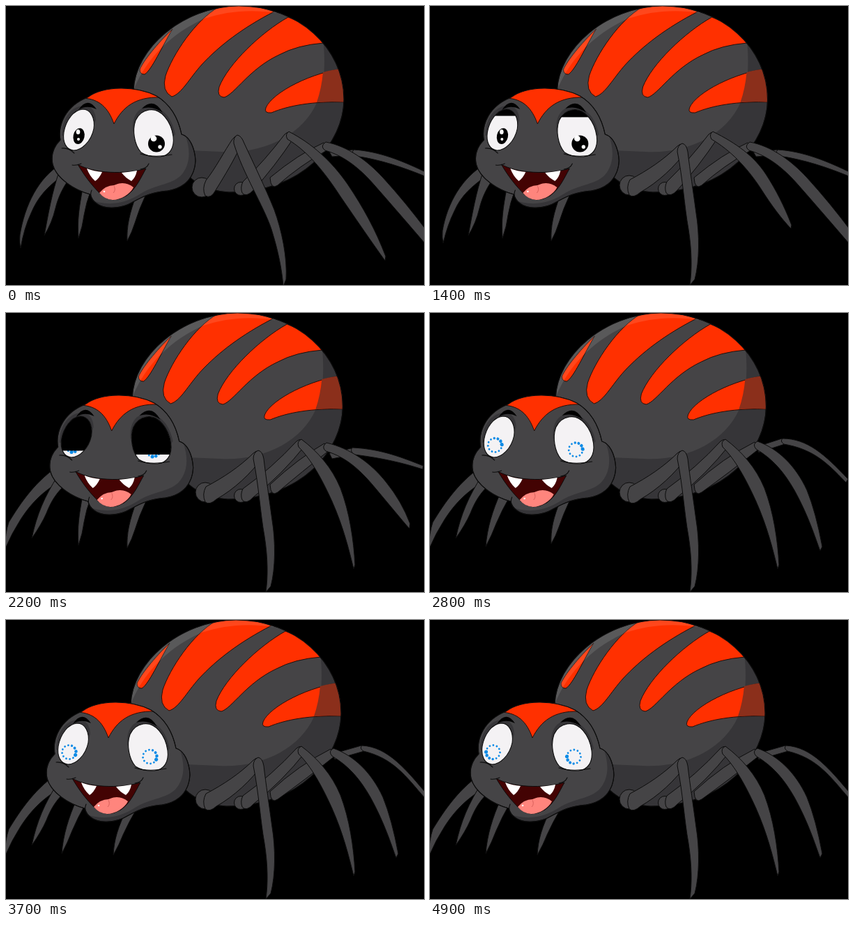
Write an HTML page without scripts that moves like this. It is 600 by 400 pixels and loops after 5000 ms.

```html
<!DOCTYPE html>
<html lang="en">
<head>
<meta charset="utf-8">
<title>Spider</title>
<style>
  html, body { margin: 0; width: 100%; height: 100%; overflow: hidden; background: #000; }
  svg { display: block; width: 100%; height: 100%; }
  .skin { fill: #454446; stroke: #0c0c0c; stroke-width: 1; stroke-linejoin: round; }
  .red { fill: #ff3000; stroke: #1a0a06; stroke-width: .9; }
  .shade { fill: #18181b; opacity: .32; }
  .light { fill: #fff; opacity: .11; }
  .white { fill: #f4f2f4; }
  .line { fill: none; stroke: #0c0c0c; stroke-width: 1.1; stroke-linecap: round; }
  .spin { fill: #0d8be6; }
</style>
</head>
<body>
<svg viewBox="0 0 600 400" preserveAspectRatio="none">
  <defs>
    <path id="body" d="M183 121C185 62 252 1 334 0C420 0 485 60 485 134C485 196 426 268 320 267C283 265 262 247 250 230L196 150Z"/>
    <clipPath id="inBody"><use href="#body"/></clipPath>
    <path id="skull" d="M117 131C140 114 186 114 216 129C236 141 247 160 252 184C263 187 271 202 272 222C271 244 258 261 232 265C206 267 194 275 182 281C166 291 141 292 130 283Q123 278 121 270C98 264 72 247 67 227C64 213 69 201 78 192C74 170 86 143 117 131Z"/>
    <clipPath id="inSkull"><use href="#skull"/></clipPath>
    <path id="eyeL" d="M110 148C122 148 128 161 126 176C122 195 108 207 97 207C86 206 81 195 83 181C86 164 97 149 110 148Z"/>
    <path id="eyeR" d="M205 149C222 146 237 165 240 187C242 203 235 215 221 216Q205 217 194 210C184 199 181 178 186 164Q192 151 205 149Z"/>
    <clipPath id="inEyeL"><use href="#eyeL"/></clipPath>
    <clipPath id="inEyeR"><use href="#eyeR"/></clipPath>
    <g id="dots">
      <g id="trio">
        <circle cx="10" r="1.4"/>
        <circle cx="10" r="1.4" transform="rotate(30)"/>
        <circle cx="10" r="1.4" transform="rotate(60)"/>
      </g>
      <use href="#trio" transform="rotate(90)"/>
      <use href="#trio" transform="rotate(180)"/>
      <circle cx="10" r="1.7" transform="rotate(-90)"/>
      <circle cx="10" r="2" transform="rotate(-60)"/>
      <circle cx="10" r="2.3" transform="rotate(-30)"/>
      <circle cx="10" r="2.6"/>
    </g>
  </defs>

  <rect width="600" height="400"/>

  <!-- far legs -->
  <g class="skin">
    <path><animate attributeName="d" dur="5s" repeatCount="indefinite" keyTimes="0;.24;.28;.36;1" values="
      M80 226C46 246 27 286 20 328Q19 340 21 347Q26 318 36 297C46 273 60 259 80 244Z;
      M80 226C46 246 27 286 20 328Q19 340 21 347Q26 318 36 297C46 273 60 259 80 244Z;
      M80 226C46 246 25 282 18 322Q17 332 19 340Q25 314 35 294C45 271 60 259 80 244Z;
      M80 216C42 240 20 274 4 300Q-1 314 -2 340Q8 316 21 296C34 276 50 257 80 240Z;
      M80 216C42 240 20 274 4 300Q-1 314 -2 340Q8 316 21 296C34 276 50 257 80 240Z"/></path>
    <path><animate attributeName="d" dur="5s" repeatCount="indefinite" keyTimes="0;.32;.42;1" values="
      M76 238C66 268 61 296 55 329Q66 311 71 290C75 273 83 258 92 246Z;
      M76 238C66 268 61 296 55 329Q66 311 71 290C75 273 83 258 92 246Z;
      M74 234C56 262 44 289 37 323Q51 303 58 287C65 269 74 255 88 244Z;
      M74 234C56 262 44 289 37 323Q51 303 58 287C65 269 74 255 88 244Z"/></path>
    <path><animate attributeName="d" dur="5s" repeatCount="indefinite" keyTimes="0;.45;.54;1" values="
      M110 262C105 288 102 308 104 333Q110 316 112 300Q115 282 122 264Z;
      M110 262C105 288 102 308 104 333Q110 316 112 300Q115 282 122 264Z;
      M101 258C90 283 82 308 80 335Q89 318 95 302Q103 283 114 264Z;
      M101 258C90 283 82 308 80 335Q89 318 95 302Q103 283 114 264Z"/></path>
    <path><animate attributeName="d" dur="5s" repeatCount="indefinite" keyTimes="0;.52;.56;.7;1" values="
      M188 268C177 298 173 316 174 337Q181 324 185 311Q191 291 201 270Z;
      M188 268C177 298 173 316 174 337Q181 324 185 311Q191 291 201 270Z;
      M188 266C177 294 173 311 174 331Q181 319 185 307Q191 289 201 268Z;
      M174 270C161 296 155 315 154 337Q163 321 168 308Q176 290 188 270Z;
      M174 270C161 296 155 315 154 337Q163 321 168 308Q176 290 188 270Z"/></path>
  </g>

  <!-- abdomen -->
  <g>
    <animateTransform attributeName="transform" type="translate" dur="5s" repeatCount="indefinite" keyTimes="0;.22;.74;1" values="0 0;0 0;-4 0;-4 0"/>
    <use href="#body" class="skin"/>
    <g clip-path="url(#inBody)">
      <g class="red">
        <path d="M239 33C217 54 197 79 192 91Q192 98 199 98C209 92 224 58 239 33Z"/>
        <path d="M306 1C272 20 239 70 229 100Q223 122 238 130C252 126 263 104 281 84C306 57 340 31 385 8Q350-6 306 1Z"/>
        <path d="M405 16C366 38 319 83 306 116Q302 130 313 131C328 127 349 90 392 70Q418 56 456 53Q440 28 405 16Z"/>
        <path d="M490 89C440 94 382 124 373 146Q370 154 381 153C405 143 440 136 490 138Z"/>
      </g>
      <path class="shade" d="M455 45C460 92 455 120 446 139C426 184 372 212 310 209L262 207L250 280H500V45Z"/>
      <path fill="#8b2f1b" d="M455 95Q470 91 490 89V138Q468 136 446 138Q453 118 455 95Z"/>
      <path class="light" d="M183 121C200 78 235 40 285 18C315 8 350 4 388 10L400-10H180Z"/>
    </g>
    <use href="#body" class="line"/>
  </g>

  <!-- near legs, back to front -->
  <g class="skin">
    <path><animate attributeName="d" dur="5s" repeatCount="indefinite" keyTimes="0;.38;.44;.56;.6;1" values="
      M464 209L498 206L501 214L468 216Z;
      M464 209L498 206L501 214L468 216Z;
      M464 201L496 194L500 203L468 209Z;
      M468 192L505 180L509 188L472 200Z;
      M468 192L510 180L514 188L472 200Z;
      M468 192L510 180L514 188L472 200Z"/></path>
    <path><animate attributeName="d" dur="5s" repeatCount="indefinite" keyTimes="0;.38;.44;.56;.6;1" values="
      M499 206C534 208 570 222 606 240L606 246C570 231 536 220 501 215Q495 211 499 206Z;
      M499 206C534 208 570 222 606 240L606 246C570 231 536 220 501 215Q495 211 499 206Z;
      M497 193C540 195 570 208 599 219L598 224C570 215 540 208 500 203Q493 198 497 193Z;
      M506 180C541 180 566 202 600 238L597 243C568 212 548 195 508 188Q502 184 506 180Z;
      M511 180C548 182 574 214 606 252L601 255C574 224 556 198 513 188Q507 184 511 180Z;
      M511 180C548 182 574 214 606 252L601 255C574 224 556 198 513 188Q507 184 511 180Z"/></path>

    <path><animate attributeName="d" dur="5s" repeatCount="indefinite" keyTimes="0;.36;.44;.53;1" values="
      M379 246Q420 212 456 196L462 206Q420 230 390 257Q380 264 379 246Z;
      M379 246Q420 212 456 196L462 206Q420 230 390 257Q380 264 379 246Z;
      M379 246Q420 208 457 187L464 197Q424 228 390 257Q380 264 379 246Z;
      M379 246Q420 208 466 185L472 195Q428 230 390 257Q380 264 379 246Z;
      M379 246Q420 208 466 185L472 195Q428 230 390 257Q380 264 379 246Z"/></path>
    <path><animate attributeName="d" dur="5s" repeatCount="indefinite" keyTimes="0;.36;.44;.53;1" values="
      M459 195C490 201 518 221 541 246Q574 282 606 325L607 347C584 320 558 290 529 257C508 233 486 215 458 207Q450 201 459 195Z;
      M459 195C490 201 518 221 541 246Q574 282 606 325L607 347C584 320 558 290 529 257C508 233 486 215 458 207Q450 201 459 195Z;
      M460 186C494 194 524 215 546 243Q568 270 580 302L579 309C566 294 552 277 531 252C510 227 490 207 459 198Q452 192 460 186Z;
      M470 184C499 194 525 219 541 254Q554 286 563 335L560 341C553 322 543 290 523 254C508 228 493 210 468 195Q462 188 470 184Z;
      M470 184C499 194 525 219 541 254Q554 286 563 335L560 341C553 322 543 290 523 254C508 228 493 210 468 195Q462 188 470 184Z"/></path>

    <circle cx="337" cy="262" r="9.5"/>
    <path><animate attributeName="d" dur="5s" repeatCount="indefinite" keyTimes="0;.28;.38;1" values="
      M340 252Q372 221 400 184Q408 176 413 189Q386 230 355 264Q345 275 339 268Q336 260 340 252Z;
      M340 252Q372 221 400 184Q408 176 413 189Q386 230 355 264Q345 275 339 268Q336 260 340 252Z;
      M340 252Q382 222 417 184Q425 177 430 189Q396 232 355 264Q345 275 339 268Q336 260 340 252Z;
      M340 252Q382 222 417 184Q425 177 430 189Q396 232 355 264Q345 275 339 268Q336 260 340 252Z"/></path>
    <path><animate attributeName="d" dur="5s" repeatCount="indefinite" keyTimes="0;.2;.28;.38;1" values="
      M406 180C439 197 467 222 490 255C513 289 531 322 545 359L544 365C526 340 504 308 480 273C458 239 433 208 404 191Q400 184 406 180Z;
      M406 180C439 197 467 222 490 255C513 289 531 322 545 359L544 365C526 340 504 308 480 273C458 239 433 208 404 191Q400 184 406 180Z;
      M406 180C440 197 465 215 482 241C497 264 509 288 519 314L518 319C504 304 491 287 475 262C455 231 430 206 404 191Q400 184 406 180Z;
      M424 181C448 199 468 222 480 251C493 285 499 325 501 361L499 367C492 338 484 306 468 270C453 237 438 210 420 192Q417 184 424 181Z;
      M424 181C448 199 468 222 480 251C493 285 499 325 501 361L499 367C492 338 484 306 468 270C453 237 438 210 420 192Q417 184 424 181Z"/></path>

    <circle cx="281" cy="260" r="14">
      <animate attributeName="cx" dur="5s" repeatCount="indefinite" keyTimes="0;.12;.24;1" values="281;281;286;286"/>
      <animate attributeName="cy" dur="5s" repeatCount="indefinite" keyTimes="0;.12;.24;1" values="260;260;257;257"/>
    </circle>
    <path><animate attributeName="d" dur="5s" repeatCount="indefinite" keyTimes="0;.12;.24;1" values="
      M287 250C300 234 314 207 325 191Q333 180 340 194C328 220 314 243 301 264Q294 277 286 272Q281 262 287 250Z;
      M287 250C301 234 318 205 329 189Q337 179 343 193C331 219 316 243 301 264Q294 277 286 272Q281 262 287 250Z;
      M287 249C312 236 336 220 355 201Q363 193 369 206C352 230 327 253 302 267Q292 276 286 271Q281 260 287 249Z;
      M287 249C312 236 336 220 355 201Q363 193 369 206C352 230 327 253 302 267Q292 276 286 271Q281 260 287 249Z"/></path>
    <path><animate attributeName="d" dur="5s" repeatCount="indefinite" keyTimes="0;.12;.24;1" values="
      M332 185Q338 186 342 197C355 225 372 260 385 292C396 322 404 361 402 392L398 402C396 378 391 352 381 320C370 287 340 240 327 197Q326 188 332 185Z;
      M336 183Q342 184 346 195C359 220 377 255 390 284C400 309 406 342 402 366L398 374C396 352 391 331 383 310C372 281 344 236 331 195Q330 186 336 183Z;
      M362 197Q368 198 370 209C373 235 378 267 382 297C387 327 387 366 380 392L373 400C376 378 376 352 371 320C365 287 363 248 355 209Q355 200 362 197Z;
      M362 197Q368 198 370 209C373 235 378 267 382 297C387 327 387 366 380 392L373 400C376 378 376 352 371 320C365 287 363 248 355 209Q355 200 362 197Z"/></path>
  </g>

  <!-- head -->
  <g>
    <animateTransform attributeName="transform" type="translate" dur="5s" repeatCount="indefinite" keyTimes="0;.24;.72;1" values="0 0;0 0;-8 0;-8 0"/>
    <use href="#skull" class="skin"/>
    <g clip-path="url(#inSkull)">
      <path class="shade" d="M246 160C266 196 268 224 251 243C238 256 215 256 195 268C173 282 150 289 118 277V300H290V160Z"/>
      <path class="red" d="M110 132C140 110 190 110 221 131C186 130 167 145 155 169C147 146 134 133 110 132Z"/>
    </g>
    <use href="#skull" class="line"/>

    <g class="shade">
      <path d="M80 186C80 160 95 143 112 143Q128 144 129 163L124 180Z"/>
      <path d="M182 180C180 158 190 144 207 144C225 145 238 160 243 184L238 190Z"/>
    </g>
    <g class="white">
      <use href="#eyeL"/>
      <use href="#eyeR"/>
    </g>

    <g>
      <animate attributeName="visibility" calcMode="discrete" dur="5s" repeatCount="indefinite" keyTimes="0;.4" values="visible;hidden"/>
      <ellipse cx="104.500" cy="186.500" rx="8" ry="11.500" transform="rotate(12 104 187)"/>
      <ellipse cx="216" cy="197.500" rx="12" ry="12"/>
      <g fill="#fff">
        <ellipse cx="103.500" cy="180.500" rx="2.800" ry="3.500"/>
        <circle cx="104" cy="191" r="2"/>
        <circle cx="212" cy="190" r="4.300"/>
        <circle cx="221" cy="202" r="2.700"/>
      </g>
    </g>
    <g class="spin" visibility="hidden">
      <animate attributeName="visibility" calcMode="discrete" dur="5s" repeatCount="indefinite" keyTimes="0;.4" values="hidden;visible"/>
      <g transform="translate(98.500 189.500) rotate(-135)">
        <use href="#dots"><animateTransform attributeName="transform" type="rotate" dur="5s" repeatCount="indefinite" from="0" to="2160"/></use>
      </g>
      <g transform="translate(214.500 196) rotate(-135)">
        <use href="#dots"><animateTransform attributeName="transform" type="rotate" dur="5s" repeatCount="indefinite" from="0" to="2160"/></use>
      </g>
    </g>

    <!-- eyelids -->
    <g clip-path="url(#inEyeL)">
      <rect x="70" y="48" width="65" height="100"><animate attributeName="y" dur="5s" repeatCount="indefinite" keyTimes="0;.26;.4;.56;1" values="48;48;114;48;48"/></rect>
    </g>
    <g clip-path="url(#inEyeR)">
      <rect x="175" y="49" width="75" height="100"><animate attributeName="y" dur="5s" repeatCount="indefinite" keyTimes="0;.26;.4;.56;1" values="49;49;121;49;49"/></rect>
    </g>
    <g class="line">
      <use href="#eyeL"/>
      <use href="#eyeR"/>
      <path d="M80 204Q90 203 98 211M193 212Q212 218 238 213"/>
    </g>
    <path d="M104 149Q117 129 130 148Q116 141 104 149ZM195 147Q212 130 225 153Q210 142 195 147Z"/>

    <!-- mouth -->
    <path fill="#430303" stroke="#0c0c0c" d="M103 227C125 240 171 242 201 233C193 247 187 262 173 272Q153 284 137 271C122 256 113 244 103 227Z"/>
    <path fill="#ff857d" d="M134 268Q143 257 155 257Q170 250 183 260C178 270 165 278 153 278Q141 277 134 268Z"/>
    <path fill="none" stroke="#d9605c" d="M155 258Q158 264 154 268"/>
    <circle cx="141" cy="266" r="1.300" fill="#fff"/>
    <path fill="#fff" d="M116 233Q126 237 138 238Q134 247 128 251Q120 244 116 233ZM166 239Q177 238 188 236Q186 246 180 251Q171 246 166 239Z"/>
    <path class="line" d="M95 228Q101 229 108 226M193 234Q202 233 205 226M123 264Q119 273 127 281"/>
  </g>
</svg>
</body>
</html>
```
